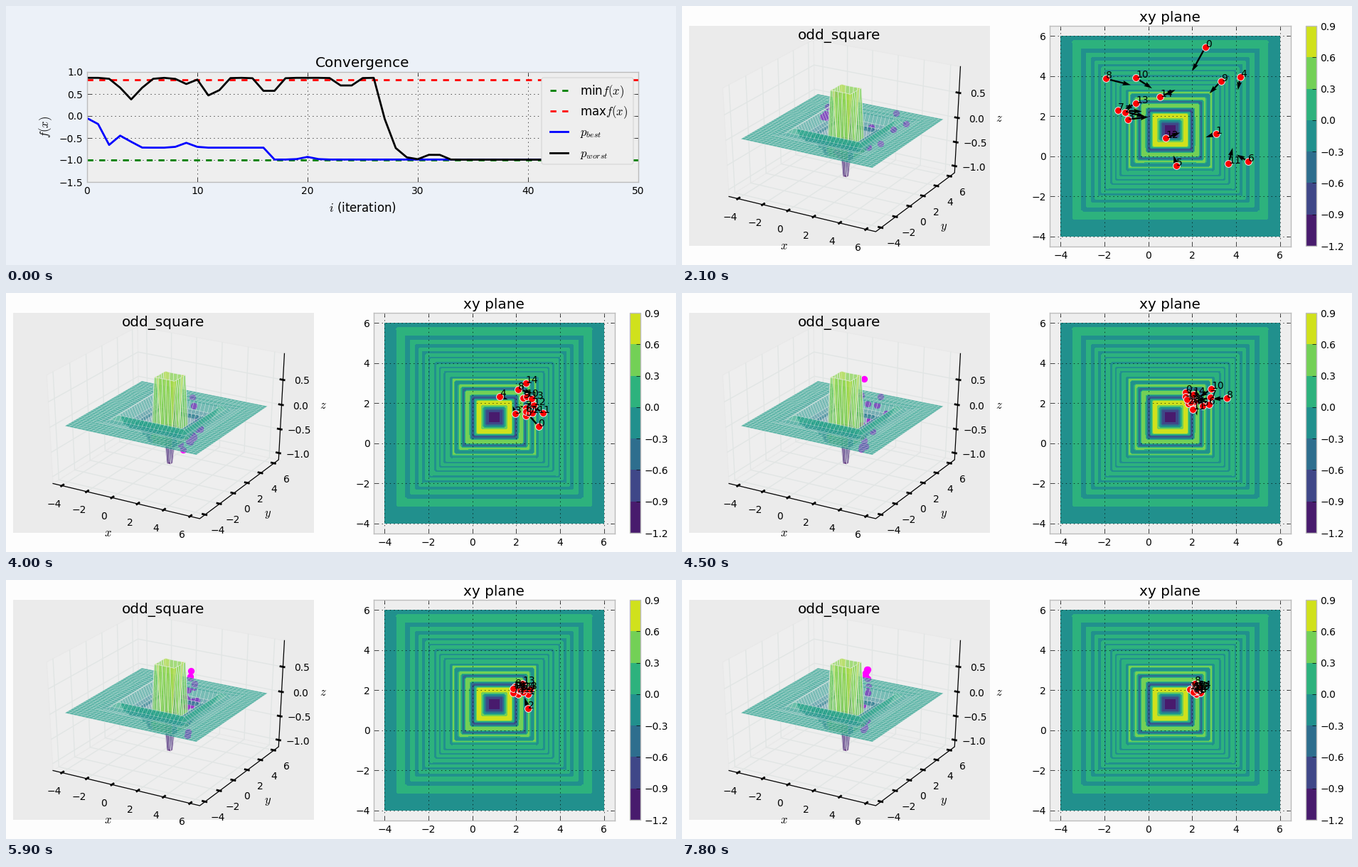
A matplotlib script that plays this animation: 942 by 365 pixels, repeating every 8000 ms.

```python
import numpy as np
import matplotlib.pyplot as plt
from matplotlib.animation import FuncAnimation
from matplotlib.collections import LineCollection, PolyCollection
from matplotlib.patches import FancyBboxPatch, Rectangle

W, H, DPI = 942, 365, 100
STEP, LOOP = 100, 8000
GREY, EDGE = "#eeeeee", "#bcbcbc"

plt.rcParams.update({
    "font.family": "DejaVu Sans", "font.size": 10, "mathtext.fontset": "cm",
    "lines.scale_dashes": False, "axes.edgecolor": EDGE, "axes.linewidth": 1,
    "xtick.direction": "in", "ytick.direction": "in",
    "xtick.top": True, "ytick.right": True,
    "xtick.major.size": 4, "ytick.major.size": 4,
    "xtick.major.width": 0.5, "ytick.major.width": 0.5,
    "xtick.major.pad": 4, "ytick.major.pad": 4,
})
fig = plt.figure(figsize=(W / DPI, H / DPI), dpi=DPI)


def box_axes(left, top, right, bottom, **kw):
    rect = [left / W, 1 - bottom / H, (right - left) / W, (bottom - top) / H]
    return fig.add_axes(rect, **kw)


def stage_axes(color, zorder):
    """Axes over the whole stage, measured in pixels from the top left."""
    ax = box_axes(0, 0, W, H, facecolor=color, zorder=zorder)
    ax.set(xlim=(0, W), ylim=(H, 0), xticks=[], yticks=[])
    ax.spines[:].set_visible(False)
    return ax


def dotted_grid(ax):
    ax.set_axisbelow("line")
    ax.grid(True, color="k", lw=0.5, linestyle=(0, (1, 3)))


# ---------- convergence chart ----------
DASH = (0, (6, 6))
steps = np.arange(49)


def bump(centre, height, width=0.75):
    return height * np.exp(-((steps - centre) / width) ** 2)


best = np.where(steps < 17, -0.72, -0.99)
best = best + bump(0.4, 0.8, 0.95) + bump(3.3, 0.32) + bump(9, 0.11) + bump(20, 0.06)
fall = np.maximum(steps - 26, 0)
worst = -0.993 + 1.86 * np.exp(-0.7 * fall ** 1.48)
worst += bump(4, -0.49, 1.13) + bump(9, -0.14) + bump(11.4, -0.53)
worst += bump(16.5, -0.46) + bump(23.5, -0.27) + bump(31.5, 0.17)

chart_back = stage_axes("#ecf1f8", 0)
chart = box_axes(114, 93, 889, 248, facecolor=GREY, zorder=1)
chart.axhline(-1.0, color="g", lw=2, ls=DASH)
chart.axhline(0.823, color="r", lw=2, ls=DASH)
chart.plot(steps, best, "b", lw=2)
chart.plot(steps, worst, "k", lw=2)
chart.set(xlim=(0, 50), ylim=(-1.5, 1), xticks=range(0, 51, 10),
          yticks=np.arange(-1.5, 1.1, 0.5))
dotted_grid(chart)

chart_top = stage_axes("none", 2)
chart_top.text(501, 86, "Convergence", size=14.4, ha="center")
chart_top.text(501.5, 284, "$i$ (iteration)", size=12, ha="center", va="center")
chart_top.text(56, 170, "$f(x)$", size=12, ha="center", va="center", rotation=90)
chart_top.add_patch(FancyBboxPatch(
    (756, 104), 123, 116, boxstyle="round,pad=3,rounding_size=3",
    fc=GREY, ec="#d4d4d4", lw=0.8))
legend = (("g", DASH, "min$f(x)$"), ("r", DASH, "max$f(x)$"),
          ("b", "-", "$p_{best}$"), ("k", "-", "$p_{worst}$"))
for row, (color, style, label) in enumerate(legend):
    y = 119 + 29.2 * row
    chart_top.plot([765, 790], [y, y], color=color, ls=style, lw=2)
    chart_top.text(807, y + 6, label, size=12)


# ---------- objective function ----------
def odd_square(x, y):
    u, v = (x - 1) ** 2, (y - 1.3) ** 2
    d = 2 * np.maximum(u, v)
    return (-np.exp(-d / (2 * np.pi)) * np.cos(np.pi * d)
            * (1 + 0.02 * (u + v) / (d + 0.01)))


axis = np.linspace(-4, 6, 100)
X, Y = np.meshgrid(axis, axis)
Z = odd_square(X, Y)

# ---------- contour plane ----------
plane = box_axes(517, 28, 856, 339, facecolor=GREY, zorder=1)
levels = np.linspace(-1.2, 0.9, 8)
contours = plane.contourf(X, Y, Z, levels, cmap="viridis")
bar = box_axes(877, 28, 892, 338, zorder=1)
fig.colorbar(contours, cax=bar)
bar.set_yticks(levels, [f"{v:.1f}".replace("-", "\u2212") for v in levels])

# ---------- perspective scene ----------
LOW = np.array([-4.5, -4.5, -1.1])
HIGH = np.array([6.5, 6.5, 0.97])
PAD = (HIGH - LOW) / 48
AZIM, ELEV, DIST = np.radians(-60), np.radians(30), 10
EYE = np.array([np.cos(AZIM) * np.cos(ELEV), np.sin(AZIM) * np.cos(ELEV), np.sin(ELEV)])
RIGHT = np.array([-np.sin(AZIM), np.cos(AZIM), 0])
UP = np.cross(EYE, RIGHT)


def project(points):
    """Stage pixels and depth of points given as (..., 3)."""
    n = (np.asarray(points, float) - LOW) / (HIGH - LOW) - 0.5
    depth = DIST - n @ EYE
    px = 10 + 423 * (n @ RIGHT / depth + 0.095) / 0.185
    py = 337 - 310 * (n @ UP / depth + 0.095) / 0.185
    return np.stack([px, py], -1), depth


scene = stage_axes("#fdfdfd", 0)
scene.add_patch(Rectangle((10, 28), 423, 310, fc="#ebebeb", lw=0))
(x0, y0, z0), (x1, y1, z1) = LOW - PAD, HIGH + PAD
panes = [
    [(x0, y0, z0), (x1, y0, z0), (x1, y1, z0), (x0, y1, z0)],
    [(x0, y0, z0), (x0, y1, z0), (x0, y1, z1), (x0, y0, z1)],
    [(x0, y1, z0), (x1, y1, z0), (x1, y1, z1), (x0, y1, z1)],
]
scene.add_collection(PolyCollection(project(panes)[0], facecolors="#eeeeee",
                                    edgecolors="#e8e8e8", linewidths=0.8))
even, z_ticks = range(-4, 7, 2), (-1, -0.5, 0, 0.5)
grid = [[(t, y0, z0), (t, y1, z0), (t, y1, z1)] for t in even]
grid += [[(x1, t, z0), (x0, t, z0), (x0, t, z1)] for t in even]
grid += [[(x0, y0, t), (x0, y1, t), (x1, y1, t)] for t in z_ticks]
scene.add_collection(LineCollection(project(grid)[0], colors="#e1e5e4", linewidths=1))

frame = [(x0, y0, z0), (x1, y0, z0), (x1, y1, z0), (x1, y1, z1)]
scene.plot(*project(frame)[0].T, color="k", lw=0.9)


def axis_ticks(values, place, outward, offset, form):
    """Short thick tick marks with their labels."""
    outward = np.array(outward) * 11 / 12
    for value in values:
        p = np.array(place(value), float)
        marks = project([p + 0.1 * outward, p - 0.2 * outward])[0]
        scene.plot(*marks.T, color="k", lw=2, solid_capstyle="projecting")
        scene.text(*(project(p)[0] + offset),
                   form.format(value).replace("-", "\u2212"),
                   ha="center", va="center")


axis_ticks(even, lambda t: (t, y0, z0), (0, -1, 0), (-11, 26.5), "{}")
axis_ticks(even, lambda t: (x1, t, z0), (1, 0, 0), (18, 23), "{}")
axis_ticks(z_ticks, lambda t: (x1, y1, t), (1, 0, 0), (26.5, 2), "{:.1f}")
for x, y, name in ((143, 338, "$x$"), (368, 311, "$y$"), (446, 158, "$z$")):
    scene.text(x, y, name, size=12, ha="center", va="center")

mesh = np.stack([X, Y, Z], -1)[::3, ::3]
quads = np.stack([mesh[:-1, :-1], mesh[:-1, 1:], mesh[1:, 1:], mesh[1:, :-1]], 2)
quads = quads.reshape(-1, 4, 3)
quads = quads[np.argsort(-project(quads)[1].mean(1))]
heights = quads[..., 2]
extreme = np.where(heights.mean(1) > 0, heights.max(1), heights.min(1))
steep = np.clip(np.ptp(heights, axis=1) / 0.3, 0, 1)
# Steep walls look paler: thinner faces and stronger white edges.
faces = plt.cm.viridis(plt.Normalize(Z.min(), Z.max())((heights.mean(1) + extreme) / 2))
faces[:, 3] = 0.7 - 0.25 * steep
edges = np.full_like(faces, 0.94)
edges[:, 3] = 0.3 + 0.4 * steep
scene.add_collection(PolyCollection(project(quads)[0], facecolors=faces,
                                    edgecolors=edges, linewidths=0.4, zorder=3))
scene.text(221, 47, "odd_square", size=14.4, ha="center", zorder=5)
scene.text(686, 22, "xy plane", size=14.4, ha="center")

# ---------- swarm ----------
TIMES = [0, 500, 2100, 2700, 3200, 3600, 4000, 4500, 4800, 5200, 5600, 5900,
         6300, 6600, 6900, 7200, 7500, 7800]
GOAL = np.array([2.2, 2.0])
START = np.transpose([
    [3, 1.7, -3.5, -1.8, 4.2, 1.45, 5.6, -3.8, -3.25, 4.3, -.85, 5.45, 0, -3.4, 1.75],
    [5.45, .6, 1.1, 2, 3.4, -.3, -2.75, 2.55, 4.95, 4.7, 5.25, -2.6, -.55, 2.9, 4.95]])
jitter = np.random.default_rng(4).laplace(size=(len(TIMES) + 1, *START.shape))


def swarm(state):
    """Particles drift from their start to the goal with shrinking jitter."""
    age = state - 1
    noise = 0.8 * np.exp(-age / 7) * jitter[state] * (age > 0)
    return GOAL + (START - GOAL) * np.exp(-age / 1.5) + noise


arrows = plane.quiver(*START.T, *START.T, angles="xy", scale_units="xy", scale=1,
                      units="dots", width=2.3, color="k", zorder=3)
dots = plane.scatter(*START.T, s=50, c="r", edgecolors=GREY, linewidths=0.7, zorder=4)
labels = [plane.text(0, 0, str(i), zorder=5, clip_on=True) for i in range(len(START))]
balls = scene.scatter(*START.T, s=45, linewidths=0, zorder=2.5)
scene.set(xlim=(0, W), ylim=(H, 0))
plane.set(xlim=(-4.5, 6.5), ylim=(-4.5, 6.5), xticks=even, yticks=even)
dotted_grid(plane)


def show_swarm(state):
    spots = swarm(state)
    arrows.set_offsets(spots)
    arrows.set_UVC(*(0.45 * (swarm(state + 1) - spots)).T)
    dots.set_offsets(spots)
    for label, spot in zip(labels, spots):
        label.set_position(spot)
    balls.set_offsets(project(np.column_stack([spots, odd_square(*spots.T)]))[0])
    balls.set_facecolor("r" if state == 1 else "magenta")


def update(i):
    state = int(np.searchsorted(TIMES, i * STEP, side="right")) - 1
    for ax in (chart_back, chart, chart_top):
        ax.set_visible(state == 0)
    for ax in (scene, plane, bar):
        ax.set_visible(state > 0)
    if state:
        show_swarm(state)
    return []


anim = FuncAnimation(fig, update, frames=LOOP // STEP, interval=STEP,
                     repeat=True, repeat_delay=0, blit=False)
plt.show()
```
